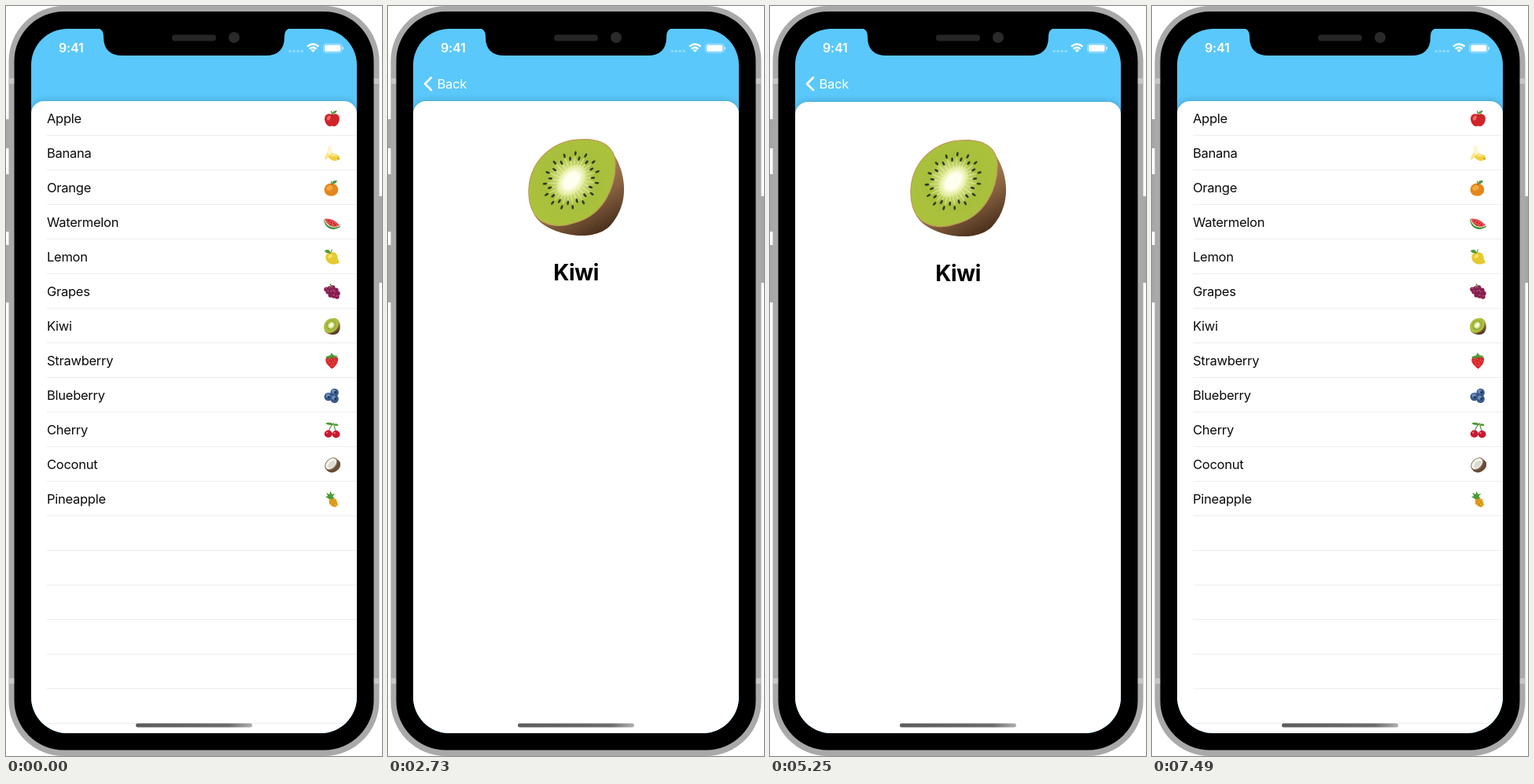
An HTML page for the animation above (7.56 s loop, 478x954 px).

```html
<!DOCTYPE html>
<html lang="en">
<head>
<meta charset="utf-8">
<title>Fruit cards</title>
<style>
  html, body { margin: 0; width: 100%; height: 100%; overflow: hidden; background: #fff; }
  body { position: relative; font: 16.5px Inter, Roboto, sans-serif; letter-spacing: -.26px; }
  .phone { position: absolute; left: 0; top: 0; width: 478px; height: 954px; }
  #screen { position: absolute; left: 32px; top: 29px; width: 414px; height: 896px;
    border-radius: 46px; overflow: hidden; background: #5ac8fa; }
  #screen > * { position: absolute; }
  .card { left: 0; top: 92px; width: 414px; height: 805px; background: #fff;
    border-radius: 16px 16px 0 0; box-shadow: 0 0 10px rgba(0, 0, 0, .22); }
  .row { height: 43px; margin-left: 20px; border-bottom: 1px solid #ededef; line-height: 44px;
    color: #0b0b0b; position: relative; }
  .row svg { position: absolute; right: 21px; top: 12px; width: 21px; height: 21px; }
  #clock, #back { color: #fff; line-height: 20px; }
  #clock { left: 35px; top: 14px; font-size: 16px; font-weight: 600; letter-spacing: -.2px; }
  #back { left: 12px; top: 60px; padding-left: 18.5px; }
  #back svg { position: absolute; left: 0; top: 0; }
  #sheet svg { position: absolute; left: 145.5px; top: 48px; width: 123px; height: 123px; }
  #sheet h1 { margin: 0; padding-top: 197.5px; font-size: 28px; line-height: 40px; font-weight: 700;
    letter-spacing: -.4px; text-align: center; color: #000; }
</style>
</head>
<body>
<svg class="phone" viewBox="0 0 478 954">
  <defs>
    <linearGradient id="skin" x1=".3" y1="0" x2=".8" y2="1">
      <stop offset=".3" stop-color="#b58a5c"/><stop offset=".65" stop-color="#85603f"/><stop offset="1" stop-color="#402716"/>
    </linearGradient>
    <radialGradient id="flesh" gradientUnits="userSpaceOnUse" cx="55" cy="53" r="62">
      <stop offset=".2" stop-color="#dfe795"/><stop offset=".5" stop-color="#a6bf3c"/><stop offset="1" stop-color="#acc23c"/>
    </radialGradient>
    <radialGradient id="core">
      <stop offset=".5" stop-color="#fffff0"/><stop offset="1" stop-color="#f4f8b8" stop-opacity=".3"/>
    </radialGradient>
    <linearGradient id="bar">
      <stop stop-color="#5c5c5c"/><stop offset=".8" stop-color="#6c6c6c"/><stop offset="1" stop-color="#b0b0b0"/>
    </linearGradient>
  </defs>
  <path d="M0 144h5v37H0zM0 214h5v73H0zM0 304h5v73H0zM474 242h4v110h-4z" fill="#a6a6a6"/>
  <rect x="3.5" width="471" height="954" rx="70" fill="#a9a9a9"/>
  <path d="M3.500 92h471v7h-471zM3.500 855h471v7h-471z" fill="#c6c6c6"/>
  <rect x="10.500" y="7" width="457" height="939.500" rx="63"/>
</svg>

<div id="screen">
  <div id="clock">9:41</div>
  <div id="back"><svg width="16" height="20"><path d="M11 2 3 10l8 8" fill="none" stroke="#fff" stroke-width="2.5" stroke-linecap="round" stroke-linejoin="round"/></svg>Back</div>
  <div id="list" class="card"></div>
  <div id="sheet" class="card"><h1>Kiwi</h1></div>
</div>

<svg class="phone" viewBox="0 0 478 954">
  <path d="M115 28q9 1 9 10v1q0 24 24 24h182q24 0 24-24v-1q0-9 9-10z"/>
  <rect x="211" y="36.5" width="56" height="8" rx="4" fill="#262626"/>
  <circle cx="290" cy="40" r="7" fill="#2a2a2a"/>
  <path d="M359.500 57.500h19" stroke="#fff" stroke-opacity=".3" stroke-width="3" stroke-dasharray="3.500 1.500"/>
  <g fill="none" stroke="#fff" stroke-width="2.3">
    <path d="M383 51.5q7-6 14.600 0M385.700 54.600q4.400-3.600 9 0"/>
    <path d="M388 56h4.600l-2.300 2.600z" fill="#fff" stroke-width="1"/>
  </g>
  <rect x="403.500" y="48" width="23.500" height="11.500" rx="3.200" fill="none" stroke="#fff" stroke-opacity=".45"/>
  <rect x="405" y="49.500" width="20.500" height="8.500" rx="2" fill="#fff"/>
  <path d="M428 52q1.600 1.700 0 3.500z" fill="#fff" stroke="#fff" stroke-opacity=".5"/>
  <rect x="165" y="912.500" width="148" height="5" rx="2.500" fill="url(#bar)"/>
</svg>

<script>
const $ = id => document.getElementById(id);
const path = (d, fill) => `<path d="${d}" fill="${fill}"/>`;
const line = (d, color, w = 1) => `<path d="${d}" fill="none" stroke="${color}" stroke-width="${w}" stroke-linecap="round"/>`;
const oval = (x, y, rx, ry, fill, turn = 0) =>
  `<ellipse rx="${rx}" ry="${ry}" fill="${fill}" transform="translate(${x} ${y}) rotate(${turn})"/>`;
const dots = (list, r, fill) => list.map(([x, y]) => oval(x, y, r, r, fill)).join('');
const icon = (body, size = 20) => `<svg viewBox="0 0 ${size} ${size}">${body}</svg>`;

function kiwi() {
  let s = path('M70 0C98 0 112 18 119 42C126 68 121 92 104 111C88 126 60 126 35 117C22 112 14 106 8 97Z', 'url(#skin)');
  s += '<path d="M70 .8C94 0 110 10 111 30C112 60 96 98 58 107C44 112 30 111 20 106C6 100 0 82 1 63C3 28 32 0 70 .8Z" fill="url(#flesh)" stroke="#c09a58" stroke-width="1.2"/>';
  s += '<g transform="translate(55 53) rotate(-50)">';
  const n = 30;
  for (let i = 0; i < n; i++) {
    const a = i / n * 2 * Math.PI, c = Math.cos(a), d = Math.sin(a), k = i % 2 ? 1 : .82;
    s += line(`M${c * 18} ${d * 12}L${c * 32} ${d * 27}`, 'rgba(240,246,180,.5)', 1.5);
    s += oval(c * 37 * k, d * 31 * k, 2.9, 1.4, '#333a24', Math.atan2(d * 31, c * 37) * 180 / Math.PI);
  }
  return icon(s + oval(0, 0, 23, 15, 'url(#core)') + '</g>', 123);
}

const leaf = d => path(d, '#4c9a35');
const fruits = {
  Apple: icon(path('M10 5C13 3 19 4 19 10C19 15 15 20 12 19Q10 18 8 19C5 20 1 15 1 10C1 4 7 3 10 5Z', '#d0242b')
    + oval(6, 9, 2, 3, '#ee6a62', 25) + line('M10 6Q10 3 9 1', '#6b3d20') + leaf('M10 4Q11 0 16 0Q15 4 10 4Z')),
  Banana: icon(path('M6 1Q9 1 9 6Q10 11 15 11Q20 13 19 17Q12 22 6 15Q3 10 6 1Z', '#f4cf3c')
    + path('M5 2Q8-1 9 3L11 10L6 13Q4 8 5 2Z', '#fff4cf') + path('M5 9Q1 12 1 18Q5 17 7 12ZM8 10Q14 9 17 13L10 14Z', '#f9e68b')
    + line('M17 16l2 1', '#9b8034')),
  Orange: icon(oval(9, 12, 8.5, 7.8, '#e5861c') + oval(7, 10, 4, 3, '#f3a83d', -25)
    + line('M10 6L9 2', '#5c7430') + leaf('M10 5Q10 0 16 1Q16 5 10 5Z')),
  Watermelon: icon(path('M0 6C1 18 12 21 20 15L19 13Z', '#3c8a3b') + path('M.5 6C3 16 12 18 19.500 14L18 12Z', '#e5efbf')
    + path('M1 5.500Q11 4 19 13C12 17 5 15 1 5.500Z', '#e5484f')
    + dots([[6, 8], [9, 10], [12, 11], [8, 13], [14, 13]], .6, '#3e1a1b')),
  Lemon: icon(path('M3 7Q8 2 14 5Q17 7 17 12L19 17L15 18Q8 20 4 15Q1 11 3 7Z', '#e6c92e')
    + oval(8, 9, 3, 2, '#f6e26c', -40) + leaf('M8 5Q2 6 1 2Q7-1 8 5Z') + line('M8 5L10 1', '#6e8a36')),
  Grapes: icon(dots([[3, 7], [7, 6], [11, 5], [15, 8], [5, 10], [9, 10], [13, 11], [17, 12], [8, 14], [12, 15], [16, 16]], 2.800, '#86204f')
    + dots([[3, 6], [7, 5], [5, 9], [9, 9], [13, 10], [12, 14], [16, 15]], 1, '#b94d7d') + line('M10 5L8 1', '#657c36', 1.500)),
  Kiwi: kiwi(),
  Strawberry: icon(path('M3 6Q10 2 17 6Q19 12 11 19Q9 20 7 17Q0 11 3 6Z', '#d9282f')
    + dots([[5, 9], [9, 8], [13, 9], [7, 12], [11, 12], [15, 11], [9, 15], [12, 15]], .5, '#f3b269')
    + leaf('M2 5L8 3L9 0L12 3L17 4L13 7L10 5L6 8Z')),
  Blueberry: icon(dots([[13, 6.500], [5.500, 11.500], [13, 14]], 5, '#39598a')
    + dots([[12, 5], [5, 10], [12, 12.500]], 2.400, '#6b91bd') + dots([[14, 6], [6, 12], [14, 14]], 1.300, '#1c2e4e')),
  Cherry: icon(line('M6 12Q7 6 12 2Q13 8 15 12', '#659344', 1.200) + leaf('M12 3Q6 5 2 2Q7-1 12 3ZM12 3Q16 1 18 4Q14 6 12 3Z')
    + oval(5.500, 14.500, 4.800, 4.500, '#ca1830') + oval(14.800, 15, 4.800, 4.500, '#ca1830')
    + dots([[4, 13], [13, 13.500]], 1.100, '#f07c83')),
  Coconut: icon(oval(11, 11, 9.500, 8, '#674b36', -30) + oval(9, 9, 9, 6.300, '#8c715b', -45)
    + oval(8.800, 8.800, 7.800, 5.200, '#f8f7f1', -45) + oval(9.500, 9.500, 5.500, 3.200, '#dcdbd3', -45)),
  Pineapple: icon(oval(11.500, 13.500, 6.500, 4.600, '#eaa823', 55)
    + line('M7 12l7 7M9 10l8 7M7 16l5-8M10 18l5-8', '#b87a1b', .7)
    + leaf('M7 10L2 7L5 6L3 2L7 4L8 0L10 4L14 3L11 6L12 9Z'))
};

const names = Object.keys(fruits);
for (let i = 0; i < 18; i++) {
  const name = names[i];
  $('list').innerHTML += `<div class="row">${name ? name + fruits[name] : ''}</div>`;
}
$('sheet').innerHTML += fruits.Kiwi;

// Vertical offsets over time, joined by a monotone cubic.
const LOOP = 7560, STEP = 70, AWAY = 820;
// The list is pulled down and springs back.
const pull = [[0, 0], [70, 0], [700, 64], [1050, 58], [1330, 18], [1540, 4], [1680, 0], [LOOP, 0]];
// The sheet slides in, is dragged and let go, rests, then is dragged away.
const slide = [[0, AWAY], [1680, AWAY], [1820, 600], [1960, 240], [2100, 70], [2240, 14], [2380, 0],
  [3080, 0], [3150, 5], [3920, 330], [4200, 305], [4620, 118], [4900, 30], [5320, 0],
  [6230, 0], [6720, 150], [7000, 290], [7210, 443], [7350, 690], [7490, 807], [LOOP, AWAY]];

function along(keys, t) {
  const i = Math.max(1, keys.findIndex(k => k[0] > t));
  const slope = j => j > 0 && j < keys.length ? (keys[j][1] - keys[j - 1][1]) / (keys[j][0] - keys[j - 1][0]) : 0;
  const tangent = j => {
    const a = slope(j), b = slope(j + 1);
    return a * b > 0 ? 2 * a * b / (a + b) : 0;
  };
  const [t0, y0] = keys[i - 1], [t1, y1] = keys[i], h = t1 - t0, u = (t - t0) / h, v = 1 - u;
  return v * v * (1 + 2 * u) * y0 + u * u * (3 - 2 * u) * y1
    + h * u * v * (v * tangent(i - 1) - u * tangent(i));
}

const start = performance.now();
function draw() {
  const t = Math.floor((performance.now() - start) % LOOP / STEP) * STEP;
  const y = along(slide, t), p = Math.min(1, y / 805);
  $('sheet').style.transform = `translateY(${y}px)`;
  $('list').style.transform = `translateY(${along(pull, t)}px) scale(${.93 + .07 * p})`;
  $('list').style.opacity = .765 + .235 * p;
  $('back').style.opacity = Math.max(0, Math.min(1, 1.1 - 1.2 * p));
  requestAnimationFrame(draw);
}
draw();
</script>
</body>
</html>
```
